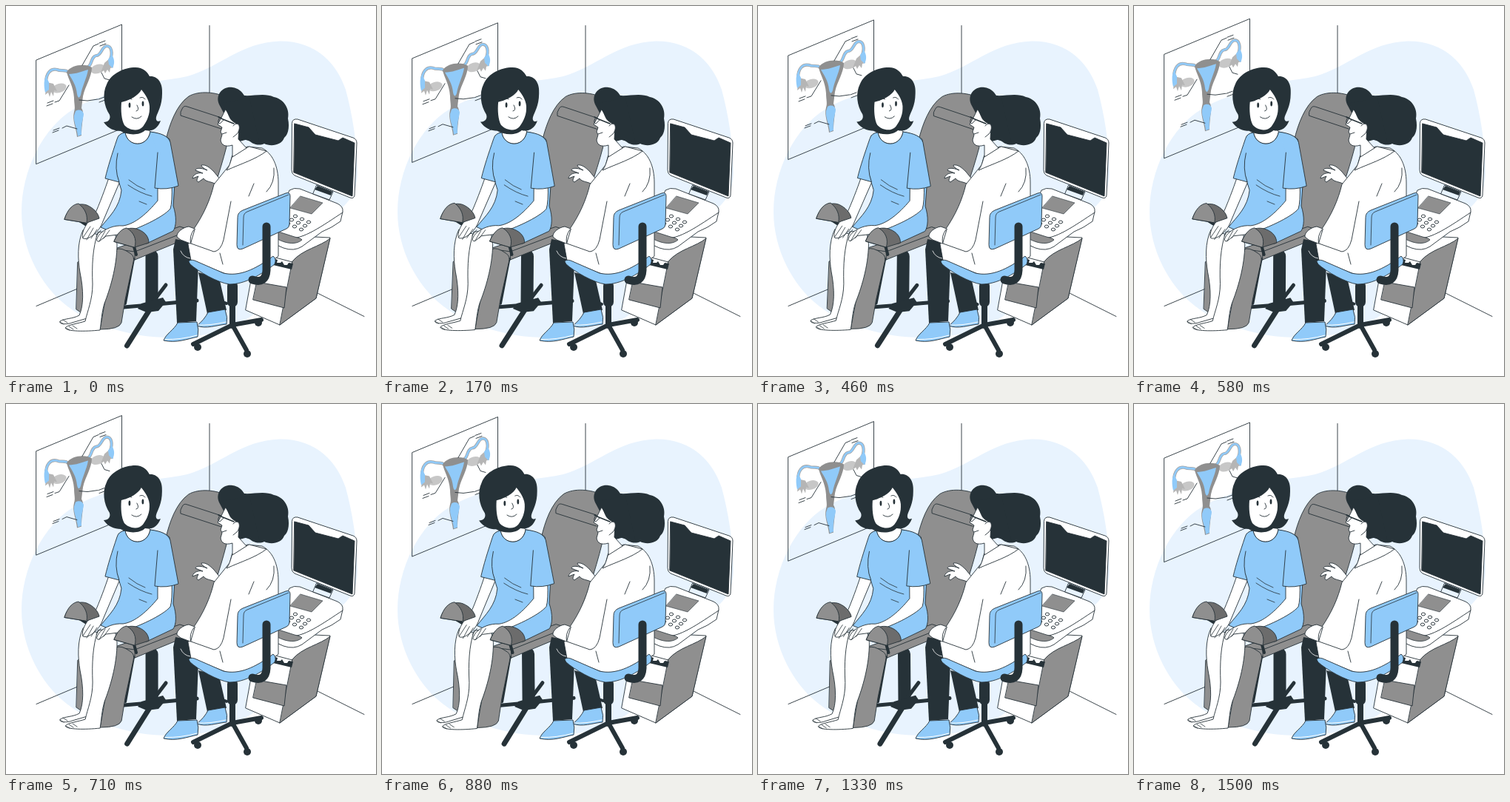
These frames come from a looping animation (500x500 px, 1540 ms). An HTML page with a canvas:

```html
<!DOCTYPE html>
<html lang="en">
<head>
<meta charset="utf-8">
<title>Consultation</title>
<style>
html, body { margin: 0; width: 100%; height: 100%; overflow: hidden; background: #fff; }
canvas { display: block; width: 500px; height: 500px; }
</style>
</head>
<body>
<canvas id="stage"></canvas>
<script>
const canvas = document.getElementById('stage');
const ctx = canvas.getContext('2d');
const ratio = window.devicePixelRatio || 1;
canvas.width = canvas.height = 500 * ratio;

const INK = '#263238', BLUE = '#90caf9', GRAY = '#8f8f8f', SHADE = '#6c6c6c', PALE = '#c7c7c7', WHITE = '#fff', MIST = '#e8f3fe';
const LOOP = 1540, CYCLE = 1500, STEP = 1000 / 24, LEAD = 30;

function shape(d, fill, stroke = INK, width = .9) {
  const path = new Path2D(d);
  if (fill) { ctx.fillStyle = fill; ctx.fill(path); }
  if (stroke) { ctx.strokeStyle = stroke; ctx.lineWidth = width; ctx.stroke(path); }
}
const flat = (d, fill) => shape(d, fill, null);
const line = (d, width = .9, color = INK) => shape(d, null, color, width);
function oval(x, y, rx, ry, fill, stroke, tilt = 0) {
  ctx.beginPath();
  ctx.ellipse(x, y, rx, ry, tilt, 0, 7);
  if (fill) { ctx.fillStyle = fill; ctx.fill(); }
  if (stroke) { ctx.strokeStyle = stroke; ctx.lineWidth = .9; ctx.stroke(); }
}

function room() {
  flat('M156 112C185 101 215 102 245 95C288 83 318 49 370 47.5C418 47 447 77 459 113C468 146 475 188 475 226C474 248 467 263 450 276C400 330 384 379 343 411C308 438 270 448 225 448C175 449 118 433 82 405C48 379 21 330 21 278C21 222 50 164 92 139C113 126 135 121 156 112Z', MIST);
  line('M41 405.5L99 381M275 26.5V125M419 387L484 419.5');
}

function poster() {
  line('M41 73L156.5 25V165.5L41 213.5Z');
  const tubes = ['M86 92C82 84 75 89 69 86C60 84 54 91 54 104', 'M111 82C116 80 115 68 122 67C129 67 129 55 136 54C143 54 144 64 141 72'];
  for (const d of tubes) {
    line(d, 4.2, '#a5a5a5');
    line(d, 2.6, BLUE);
  }
  oval(72, 111, 10, 6, PALE, null, -.3);
  oval(124, 85, 10, 6, PALE, null, -.3);
  flat('M55 103L64 105L69 115L65 114L64 122L61 116L59 123L57 117L53 120Z', '#b5b5b5');
  flat('M142 69L133 77L128 90L132 87L134 91L137 86L140 90L141 84L145 83Z', '#b5b5b5');
  flat('M54 95L58 103L58 113L53 117C51 108 51 100 54 95ZM143 66C147 72 147 78 144 84L139 79L138 72Z', BLUE);
  flat('M82 89C88 79 108 77 116 83C116 96 107 108 104 122L102 138C107 146 102 155 102 175L96 177C95 165 89 154 92 143C94 138 92 132 92 124C91 108 84 99 82 89Z', GRAY);
  flat('M85 92C94 92 104 88 111 86C109 98 103 108 101 120C99 126 97 124 96 119C95 107 89 99 85 92Z', BLUE);
  flat('M94 142C99 139 104 141 105 146C104 154 101 160 102 174L97 176C96 165 91 157 92 148Z', BLUE);
  line('M103 80L118 54L125 51M85 107L72 128L66 130M99 127L110 128L124 126M96 166L82 162L76 165M129 90L133 98L140 100');
  line('M126 50L134 47M127 54L135 51M56 131L64 128M55 135L63 132M125 126L133 123M126 130L134 127M64 168L72 165M63 171L71 168');
}

function machine() {
  shape('M338 333L352 309L438 313L419 395L370 431L324 411Z', WHITE);
  shape('M387 345C400 329 425 325 438 314L419 395L370 431Z', GRAY);
  line('M338 333L387 346');
  shape('M339 373L379 380L376 408L334 397Z', GRAY);
  flat('M361 341L367 343L366 347H371L373 345L376 350H380L382 347L388 348L386 356L361 350Z', INK);
  shape('M356 313L383 249Q389 245 397 247L448 267Q456 271 455 278L452 291Q440 300 427 305L400 325Q389 332 375 327L359 320Z', WHITE);
  line('M360 304L383 313C400 317 429 296 455 279');
  shape('M398 257L428 266L413 281L384 273Z', GRAY, INK, .6);
  shape('M365 304L390 312Q399 314 400 316C391 324 376 320 367 315Z', GRAY, INK, .8);
  for (let i = 0; i < 9; i++) {
    const row = i / 3 | 0, col = i % 3;
    oval(391 + col * 9 - row * 5, 284 + col * 4 + row * 5, 2.7, 2, WHITE, INK);
  }
  shape('M420 242L442 251L437 262L415 254Z', MIST);
  flat('M421 243L441 251L439 256L417 248Z', INK);
  shape('M386.5 158Q387 152 394 153L469 178Q474 180 474 185L471 256Q470 261 465 259L390 229Q386 227 386 222Z', WHITE);
  shape('M390 159L409 164L418 174L449 182L455 178L471 185L468 257L389 225Z', INK);
}

function examChair() {
  line('M197 338V404', 17);
  line('M159 407L194 404L258 398M197 402L216 377', 5);
  line('M195 409L163.5 459', 7);
  flat('M183 402L212 394L216 400L206 412L190 414L178 409Z', INK);
  line('M280 396L298 402', 4);
  shape('M216 181C221 160 230 134 247 122C261 114 284 116 299 124L298 190C289 225 275 268 258 300L237 307L223 304Z', GRAY);
  line('M291 151L245 136Q240 134 238 139Q235 143 236 148L291 166');
  shape('M150 327L235 298L250 303V312L174 343L160 340Z', GRAY);
  line('M151 329L174 332L249 303M174 332V343');
  shape('M97 346Q105 340 110 350L111 414L104 416L95 410Z', GRAY);
  line('M172 342L161 402', 4);
  shape('M149 329Q155 325 169 335Q174 339 172 346L161 397L156 428Q153 437 127 437L135 392Z', GRAY);
  line('M98 289L109 296M171 318L176 336', 4);
}

function woman() {
  // legs and feet
  shape('M104 303C96 320 97 343 100 360C105 384 105 405 99 418C90 423 79 422 73 426C71 431 85 430 89 428L113 421L126 310Z', WHITE);
  shape('M124 306C117 328 116 350 117 376C117 397 110 412 107 426C98 429 82 431 80 435C82 440 107 440 127 438C129 426 129 415 133 402C140 384 150 353 150 322L147 304Z', WHITE);
  line('M73 427L78 430M77 424L83 428M81 435L86 438M85 433L91 437M90 432L96 436', .8);
  // neck, dress and arms
  shape('M163 160L161 171C164 191 191 192 195 170L187 160Z', WHITE);
  shape('M139 232C134 247 127 266 119 284C108 293 101 307 104 314C111 317 126 306 131 291L154 237Z', WHITE);
  shape('M161 171C164 191 191 192 195 170C206 172 216 175 221 180L228 240L226 270C231 285 230 298 226 304L190 321C175 312 149 309 128 299C139 285 154 272 156 249L147 220L152 176Z', BLUE);
  shape('M161 171Q152 172 150 180C143 201 138 216 134 233L153 238Q146 220 151 199', BLUE);
  shape('M205 242L205 263C191 280 174 295 158 297C146 296 134 301 127 308C122 314 121 319 126 318L135 311L151 309C178 302 213 285 222 274Q225 265 224 241Z', WHITE);
  shape('M195 170C211 172 219 176 222 184L233 243Q217 249 201 246L205 198', BLUE);
  line('M166 235Q177 244 188 248M165 242Q181 253 197 257M180 264L190 268', .8);
  line('M104 313L114 298M109 316L118 300M115 314L123 302M122 311L128 303M126 318L134 304M132 314L140 303', .8);
  // stirrup pads
  shape('M79 288C84 272 97 265 109 269C119 273 125 281 126 287L109 293Z', SHADE);
  shape('M79 288C83 275 90 268 98 267C107 274 111 283 109 293Z', GRAY);
  shape('M146 318C151 303 166 297 179 302C189 306 193 313 193 320L174 326Z', SHADE);
  shape('M146 318C150 308 156 301 163 300C173 306 177 315 174 326Z', GRAY);
  // head
  flat('M155 169C147 169 138 166 132 157C138 157 142 153 140 147C132 135 130 118 136 106C142 91 160 83 175 83C185 83 191 89 194 95C205 94 212 104 211 118C211 135 205 143 203 150C202 155 205 157 209 155C205 166 197 170 188 168C181 175 165 175 155 169Z', INK);
  flat('M156 130C168 127 179 121 183 113C188 119 195 129 194 139C194 150 188 159 185 163C178 171 165 167 160 161C156 154 155 141 156 130Z', WHITE);
  oval(167, 134, 1.4, 3.5, INK);
  oval(185, 132, 1.4, 3.5, INK);
  line('M162 128Q166 124 170 126M181 124Q185 122 188 126M177 134Q181 141 176 142M170 150Q177 155 183 149');
}

function doctor() {
  // trousers and shoes
  flat('M260 360L288 367L298 411L272 416Z', INK);
  flat('M229 315L250 319L260 348L257 426L231 428L226 329Z', INK);
  line('M236 331Q240 340 249 341', .8, WHITE);
  shape('M273 414L296 410Q300 421 298 430C285 431 270 437 258 432Q268 424 273 414Z', BLUE);
  line('M259 431Q276 432 297 427', 1, WHITE);
  shape('M232 428L258 427Q261 437 259 447C245 450 230 456 213 452C216 443 227 438 232 428Z', BLUE);
  line('M215 450.5Q236 451 258 445', 1, WHITE);
  // coat and hands
  shape('M290 235L281 224C275 218 270 214 264 215Q264 218 272 222C263 218 256 219 256 222L266 226C257 224 252 230 252 233L260 230Q256 237 260 238L267 233C270 238 278 237 284 241Z', WHITE);
  shape('M306 202L326 190L346 192C360 199 368 216 368 239V338C340 361 320 367 297 362L250 344L246 322L254 301C267 282 276 262 281 241L302 215Z', WHITE);
  shape('M255 301L247 298C239 299 230 306 231 312L236 316L249 321Z', WHITE);
  line('M254 302Q247 312 250 321L281 332Q290 331 294 316L304 264');
  line('M335 240L328 257M362 219Q364 239 352 251M289 334L293 349');
  shape('M306 202C304 209 302 217 298 222C318 213 338 207 352 196L329 190Z', WHITE);
  // head
  flat('M288 133C282 119 294 108 306 110C314 111 319 116 322 121C334 122 350 117 362 123C374 125 384 138 381 152C384 166 380 175 376 178C372 189 357 190 349 186C341 190 331 186 327 180L312 184L297 150Z', INK);
  shape('M297 139L291 151L286 160L292 164L290 170L292 174L290 181C291 188 296 191 306 188L306 204L325 192L314 180L315 162C310 157 305 157 302 150Z', WHITE);
  flat('M295 138L304 151Q309 158 315 159L318 179L343 187L329 124L288 132Z', INK);
  shape('M307 162C314 154 319 164 312 173L307 177', WHITE);
  line('M287 150L293 153L308 159', 1.5);
  line('M288 152Q285 158 289 159L294 154M292 173L298 171');
}

function stool() {
  line('M306 378V400', 14);
  line('M306 400V432', 8);
  line('M306 431L253 457M306 431L325 465M306 431L345 424', 6);
  for (const [x, y] of [[259, 461], [326, 470], [341, 428]]) oval(x, y, 5, 5, INK);
  shape('M247 345Q249 342 255 344L294 361C315 366 337 356 361 338Q366 342 363 349C345 363 323 376 302 376C286 374 260 359 249 349Z', BLUE);
  shape('M313 285Q313 279 320 276L378 253Q384 251 384 257L383 295Q383 299 379 301L320 328Q312 331 312 323Z', BLUE);
  line('M320 323L321 286Q321 280 326 278L382 255', .8);
  line('M352 298V357Q351 376 333 370', 11);
}

// Frame-stepped clock; both motions share one linear cycle.
const lift = p => 10 * (1 - Math.abs(1 - 2 * p));
const sway = p => (p < .25 ? 4 * p : p < .75 ? 2 - 4 * p : 4 * p - 4) * Math.PI / 180;
const rest = LEAD / CYCLE;

function draw(time) {
  const frame = Math.floor((time % LOOP + 4) / STEP) % 37;
  const p = (frame * STEP + LEAD) % CYCLE / CYCLE;
  ctx.setTransform(ratio, 0, 0, ratio, 0, 0);
  ctx.fillStyle = WHITE;
  ctx.fillRect(0, 0, 500, 500);
  ctx.lineCap = ctx.lineJoin = 'round';
  room();
  ctx.save();
  ctx.translate(0, lift(rest) - lift(p));
  poster();
  ctx.restore();
  machine();
  ctx.save();
  ctx.translate(186, 272);
  ctx.rotate(sway(p) - sway(rest));
  ctx.translate(-186, -272);
  examChair();
  woman();
  ctx.restore();
  doctor();
  stool();
}

const start = performance.now();
function tick() {
  draw(performance.now() - start);
  requestAnimationFrame(tick);
}
tick();
</script>
</body>
</html>
```
